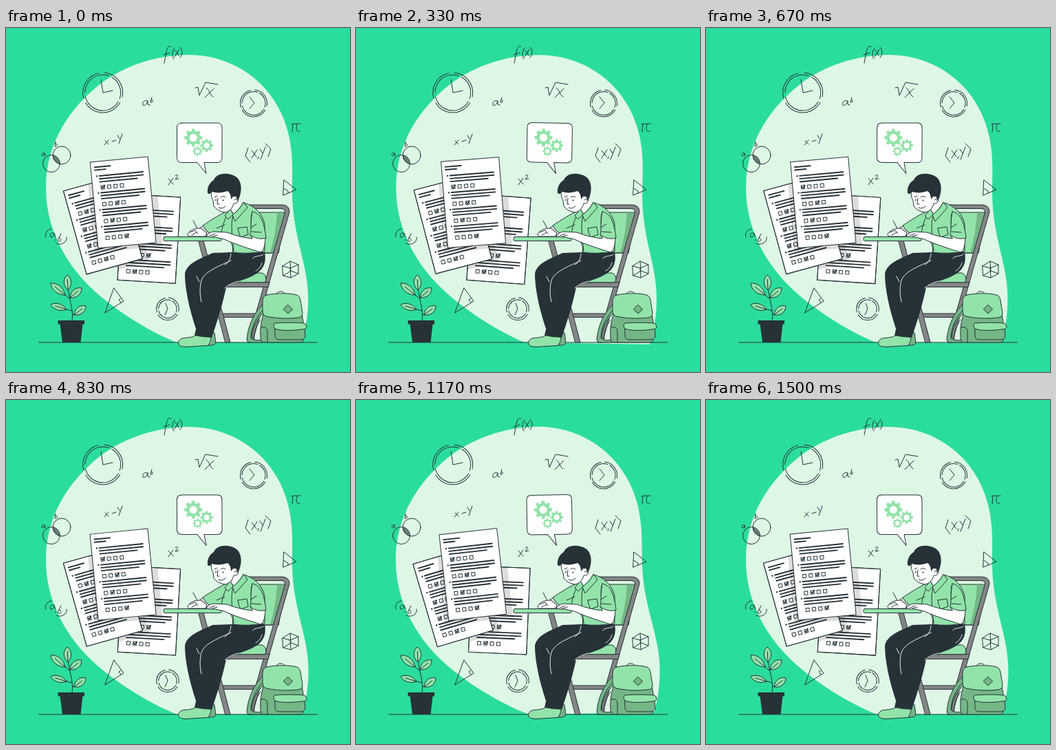
Animation of 500x500 px, one loop 1540 ms. Source, as an HTML page:

```html
<!DOCTYPE html>
<html lang="en">
<head>
<meta charset="utf-8">
<title>Student at a desk</title>
<style>
  html, body { margin: 0; width: 100%; height: 100%; overflow: hidden; background: #2bdd9c; }
  svg { display: block; width: 100vw; height: 100vh; }
  .ink { fill: none; stroke: #263238; stroke-width: 1; stroke-linecap: round; stroke-linejoin: round; }
  .o { stroke: #263238; stroke-width: 1; stroke-linejoin: round; stroke-linecap: round; }
  .g { fill: #92e3a9; }
  .s { fill: #75b687; }
  .w { fill: #fff; }
  .d { fill: #263238; }
  .m { fill: #858585; }
  .crease { fill: none; stroke: #fff; stroke-width: .9; stroke-linecap: round; }
</style>
</head>
<body>
<svg viewBox="0 0 500 500">
  <defs>
    <clipPath id="ring"><circle cx="66" cy="197" r="12.5"/></clipPath>
    <clipPath id="lens" clip-path="url(#ring)"><circle cx="81" cy="185" r="13"/></clipPath>
  </defs>
  <rect width="500" height="500" fill="#2bdd9c"/>

  <path id="blob" fill="#def7e5" d="M248 457C205 440 150 405 118 372C85 338 58 290 58 232C58 165 95 115 135 83C170 55 220 39 265 39C325 39 372 72 395 114C420 160 416 200 416 240C417 305 438 340 439 388C440 415 435 440 430 457Z"/>

  <!-- formulas -->
  <g class="ink">
    <path d="M240 27C236 25 234 29 233 35L230 51M229 39L238 36M245 29C241 34 241 41 244 45M246 32L251 40M252 31L245 42M253 28C257 32 257 38 253 43"/>
    <path d="M206 106C201 104 198 108 199 112C202 114 205 110 206 106L206 111L209 112M212 101L210 108C214 109 215 104 211 105"/>
    <path d="M275 87L279 86L281 98L290 79L308 82M291 87C295 88 297 99 301 100M302 88L289 101"/>
    <path d="M415 140C420 138 424 140 428 139M417 140L416 151M423 140C421 147 422 152 427 150"/>
    <path d="M352 174L348 186L355 195M357 178L364 187M365 177L357 189M367 187L366 190M369 176L373 182M377 173L370 191M377 168L385 176L381 187"/>
    <path d="M144 164L149 169M149 163L143 170M154 165L160 163M162 156L165 161M169 154L164 168"/>
    <path d="M236 219L243 227M243 218L236 228M246 215C248 212 251 214 249 216L246 220L251 219"/>
    <path d="M66 292C59 293 56 299 58 304M69 298C65 297 63 301 65 304C68 305 70 301 70 298L72 304M73 307L71 309M80 299L75 309C79 313 83 306 77 305M88 304C90 311 80 317 73 313"/>
    <path d="M56 182C53 180 51 184 53 186C55 186 56 184 56 182L57 186M72 165L71 172C75 173 76 168 72 168"/>
    <circle cx="66" cy="197" r="12.5"/><circle cx="81" cy="185" r="13"/>
    <path clip-path="url(#lens)" stroke-width="1.3" d="M60 180l24 24M60 183l24 24M60 186l24 24M63 180l24 24M66 180l24 24M69 180l24 24M72 180l24 24"/>
    <path d="M404 221L422 235L403 243ZM403.500 233L410 237L410 240"/>
    <path d="M157 378L171 397L144 414ZM167 393L164 395L167 399"/>
    <path d="M402 346L413 349L414 363L403 360ZM413 349L425 344L425 357L414 363M402 346L413 339L425 344M413 339L414 353L403 360M414 353L425 357"/>
    <g id="clocks"></g>
  </g>

  <g id="papers"></g>

  <g id="bubble">
    <path class="o w" d="M255.500 138H307.500Q314 138 314 145V188.500Q314 195.500 307 195.500H288L291 211.500L278 195.500H255.500Q248.500 195.500 248.500 188.500V145Q248.500 138 255.500 138Z"/>
    <g id="gears" class="g" fill-rule="evenodd"></g>
  </g>

  <!-- plant -->
  <path class="ink" d="M96 426C99 408 90 392 90 372M92 393L74 378M92 393L104 382M96 411L74 405M97 417L110 408"/>
  <g class="o g" id="leaves"></g>
  <path class="d" d="M75.500 425H114V430.500H111.500L108.500 457H82L78.500 430.500H75.500Z"/>

  <path class="ink" d="M47.500 457H452.500"/>

  <!-- chair -->
  <path class="o g" d="M366 268H406L396 327H367Z"/>
  <path class="s" d="M394 268.500H405.500L395.500 326.500H384Q392 300 394 268.500Z"/>
  <path class="ink" d="M406 268L396 327H367"/>
  <g class="o m">
    <path d="M303 415H369V420.500H303Z"/>
    <path d="M280 309H287L326 457H319Z"/>
    <path d="M350 257H402Q412 258 412 267L411 271L358 457H351L405 270Q407 263 400 262.500H350Z"/>
    <path d="M284 369.500H383L381 376.500H285Z"/>
  </g>
  <path class="o g" d="M284 369.500C286 362 300 358 320 357L372 356Q380 359 377 369.500Z"/>

  <!-- backpack -->
  <path class="ink" d="M393 388C393 381 405 381 406 388" stroke-width="2.200"/>
  <path class="o s" d="M376 399C361 411 351 434 350 454L353 457H372L375 452C366 455 360 454 357 451C357 437 365 422 375 414Z"/>
  <path class="ink" d="M356 451C356 436 364 419 374 410M370 424C363 434 360 444 361 453"/>
  <path class="o s" d="M376 410H429L432 427V452Q432 457 427 457H376Q370 457 370 450C369 437 371 425 376 410Z"/>
  <path class="o g" d="M379 388C394 385 412 385 422 388Q427 389 428 396L431 414Q431 421 424 421C408 423 392 422 378 419Q373 417 373 411V396Q373 390 379 388Z"/>
  <path class="o s" d="M410 402.500L416.500 409L410 415L403.500 409Z"/>
  <path class="o s" d="M391 437L434 436L435 448Q434 453 428 453H397Q391 453 391 447Z"/>
  <path class="o g" d="M391 429C405 428 420 428 433 429Q437 430 437 435Q436 438 430 438C415 440 402 440 394 438Q389 437 389 432Z"/>
  <path class="ink" d="M370 436C374 433 379 435 380 440V457"/>

  <!-- shoes -->
  <path class="o s" d="M296 440L303 443L305 458Q302 462 294 461Z"/>
  <path class="o g" d="M275 447C271 450 263 450 256 451Q249 454 251 460Q253 463.500 262 463.500L294 461.500Q299 453 298 447Z"/>

  <!-- legs -->
  <path class="d" d="M328 326L300 327C284 335 263 341 260 357C260 380 267 410 276 437L290 430L310 365L340 345Z"/>
  <path class="d" d="M325 326H376C379 342 374 353 357 361C342 368 326 371 320 377C315 401 307 427 299 450Q286 450 274 447C281 421 279 393 283 371C285 356 303 350 325 340Z"/>
  <path class="crease" d="M284 398C281 386 282 374 284 367C288 355 305 348 327 338M327 328C326 336 324 341 318 344M359 335C361 330 369 333 374 329M363 353C368 350 371 346 372 341M318 378C324 372 331 370 338 368M277 361L281 369"/>

  <!-- far arm -->
  <path class="o" fill="#d9d9d9" d="M289 286L302 299L286 302L279 293Z"/>
  <path class="o g" d="M326 264C312 270 298 279 286 287Q290 295 297 299L322 297Z"/>

  <!-- torso -->
  <path class="o g" d="M326 264L346 254C360 258 372 268 376 285L376 325Q350 329 329 326C332 315 324 306 313 300C314 288 318 276 326 264Z"/>
  <path class="ink" d="M330 273C326 285 329 305 331 325M337 291L350 289L352 300L341 304Q338 299 337 291M318 286L306 291M357 270C355 280 357 290 357 301"/>
  <path class="w" d="M317 262L331 249L344 254L330 271Z"/>
  <path class="o g" d="M326 265L333 281L351 261L345 253Q341 263 331 270Z"/>
  <path class="o g" d="M326 263L318 273L323 278L330 271Z"/>

  <!-- head -->
  <path class="o w" d="M300 229C298 237 297 244 301 251L302 259Q307 266 318 268C325 267 329 262 331 255Q337 256 338 249Q336 242 331 245L328 225Z"/>
  <path class="d" d="M293 240C292 230 297 224 302 221C305 213 316 210 327 213C341 216 345 231 339 247L335 252Q337 244 331 244L327 249C327 243 325 239 322 237C313 240 306 240 299 238Q297 243 293 240Z"/>
  <g class="ink">
    <path d="M303 246L307 244M312 246Q316 243 319 246M308 247L307 256L310 256M309 261Q314 264 319 259M332 250Q334 247 335 249"/>
  </g>
  <circle class="d" cx="305" cy="250" r="1"/><circle class="d" cx="315.500" cy="250.500" r="1.100"/>

  <!-- desk, hand, pen -->
  <path class="ink" stroke-width="2" d="M272 280L282 299"/>
  <path class="o w" d="M264 300C267 293 276 291 283 291L292 298L290 303H266Z"/>
  <path class="ink" d="M267 297L275 294L279 299M270 301L277 297"/>
  <rect class="o g" x="229" y="303.500" width="84" height="6" rx="1.500"/>

  <!-- near arm -->
  <path class="o w" d="M356 301L377 306C376 316 375 324 370 326C354 321 332 314 317 307L304 304Q296 304 291 303Q294 297 302 296L321 297C334 302 346 305 358 306Z"/>
  <path class="ink" d="M296 302L304 299M300 303L307 301"/>
  <path class="o g" d="M358 267C369 269 375 280 378 305Q368 309 355 301C357 292 355 282 358 267Z"/>
  <path class="ink" d="M356 290L364 285M357 296L371 297"/>
</svg>
<script>
  const $ = id => document.getElementById(id);
  const INK = '#263238', W = 84.3, H = 125.5;

  // x, y, angle and the ticked box of each row
  const sheets = {
    back: [169.5, 241, 3.4, [0, 2, 3, 1]],
    left: [83.5, 237, -15.5, [1, 0, 0, 2]],
    main: [122.3, 195, -5.4, [0, 2, 1, 3]]
  };
  const place = ([x, y, a]) => `translate(${x} ${y}) rotate(${a})`;
  const clip = k => `<clipPath id="clip-${k}"><rect width="${W}" height="${H}" transform="${place(sheets[k])}"/></clipPath>`;
  const shadow = (k, on) => `<g clip-path="url(#clip-${on})"><rect x="-6" y="-2" width="${W + 15}" height="${H + 8}" fill="#d9d9d9" fill-opacity=".9" transform="${place(sheets[k])}"/></g>`;
  const edge = k => `<rect class="ink" width="${W}" height="${H}" transform="${place(sheets[k])}"/>`;

  function sheet(k) {
    const s = sheets[k];
    let lines = 'M5.500 8H28.500M5.500 12.200H21.500', boxes = '', ticks = '', dots = '';
    s[3].forEach((tick, row) => {
      const y = 21.2 + row * 24.6;
      lines += `M11.500 ${y}H75M11.500 ${y + 4.3}H75M11.500 ${y + 8.6}H66`;
      dots += `<circle class="d" cx="7.800" cy="${y}" r="1.200"/>`;
      for (let i = 0; i < 4; i++) boxes += `M${12.4 + i * 9.3} ${y + 14.3}h5v5h-5z`;
      ticks += `M${13.4 + tick * 9.3} ${y + 16.3}l1.500 1.800l3 -4`;
    });
    return `<g transform="${place(s)}"><rect class="o w" width="${W}" height="${H}"/>
      <path class="ink" stroke-linecap="butt" style="stroke-width:1.900" d="${lines}"/>${dots}
      <path class="ink" d="${boxes}"/><path class="ink" style="stroke-width:1.600" d="${ticks}"/></g>`;
  }

  $('papers').innerHTML = clip('back') + clip('left') +
    sheet('back') + shadow('left', 'back') + shadow('main', 'back') + edge('back') +
    sheet('left') + shadow('main', 'left') + edge('left') + sheet('main');

  // shadows sit under the print
  for (const g of $('papers').querySelectorAll('g[clip-path]')) g.style.mixBlendMode = 'multiply';

  function gear(x, y, r, hole, n) {
    const pts = [], step = 2 * Math.PI / n, inner = r * .76;
    for (let i = 0; i < n; i++)
      for (const [f, q] of [[-.31, inner], [-.2, r], [.2, r], [.31, inner]]) {
        const a = (i + f) * step;
        pts.push(`${(x + q * Math.sin(a)).toFixed(2)} ${(y - q * Math.cos(a)).toFixed(2)}`);
      }
    return `<path d="M${pts.join('L')}ZM${x - hole} ${y}a${hole} ${hole} 0 1 0 ${2 * hole} 0a${hole} ${hole} 0 1 0 ${-2 * hole} 0"/>`;
  }
  $('gears').innerHTML = gear(272.3, 159.5, 13.2, 5.6, 8) + gear(291.7, 170.7, 9.4, 4.2, 8) + gear(278.3, 179.2, 7, 3.2, 8);

  function clock(x, y, r, gap, hands) {
    const ring = (q, dash, a) => `<circle cx="${x}" cy="${y}" r="${q}" pathLength="100" stroke-dasharray="${dash}" transform="rotate(${a} ${x} ${y})"/>`;
    return ring(r, '27 5 33 4 26 5', -85) + ring(r - gap, '38 4 30 3 22 3', 30) + `<path d="${hands}"/>`;
  }
  $('clocks').innerHTML =
    clock(140.7, 94, 29, 3, 'M138 75L141 94L155 91') +
    clock(360, 109.5, 19.5, 2.5, 'M354 100L361 109L354 117') +
    clock(235, 408.3, 16.3, 3, 'M232 400L235 408L231 417');

  // leaf from base to tip with a midrib
  function leaf(x, y, tx, ty, w) {
    const dx = tx - x, dy = ty - y, l = Math.hypot(dx, dy), nx = -dy / l * w, ny = dx / l * w;
    const side = k => [.3, .75].map(f => `${x + dx * f + k * nx} ${y + dy * f + k * ny}`);
    const [a, b] = side(1), [c, d] = side(-1);
    return `<path d="M${x} ${y}C${a} ${b} ${tx} ${ty}C${d} ${c} ${x} ${y}L${x + dx * .7} ${y + dy * .7}"/>`;
  }
  $('leaves').innerHTML = leaf(90, 381, 89, 359, 7) + leaf(86, 388, 65, 371, 7) + leaf(93, 392, 110, 378, 7) +
    leaf(88, 409, 65, 402, 6) + leaf(99, 417, 116, 404, 7);

  const LOOP = 1540;
  // 0 to 1 at a quarter, to -1 at three quarters, back to 0
  function sway(p) {
    return p < .25 ? p * 4 : p < .75 ? 2 - p * 4 : p * 4 - 4;
  }
  const pivots = { blob: [248.5, 249], papers: [168, 279.5], bubble: [281.2, 174.7] };

  let start;
  function draw(now) {
    start ??= now;
    const a = sway((now - start) % LOOP / LOOP).toFixed(4);
    for (const id in pivots) $(id).setAttribute('transform', `rotate(${a} ${pivots[id]})`);
    requestAnimationFrame(draw);
  }
  requestAnimationFrame(draw);
</script>
</body>
</html>
```
